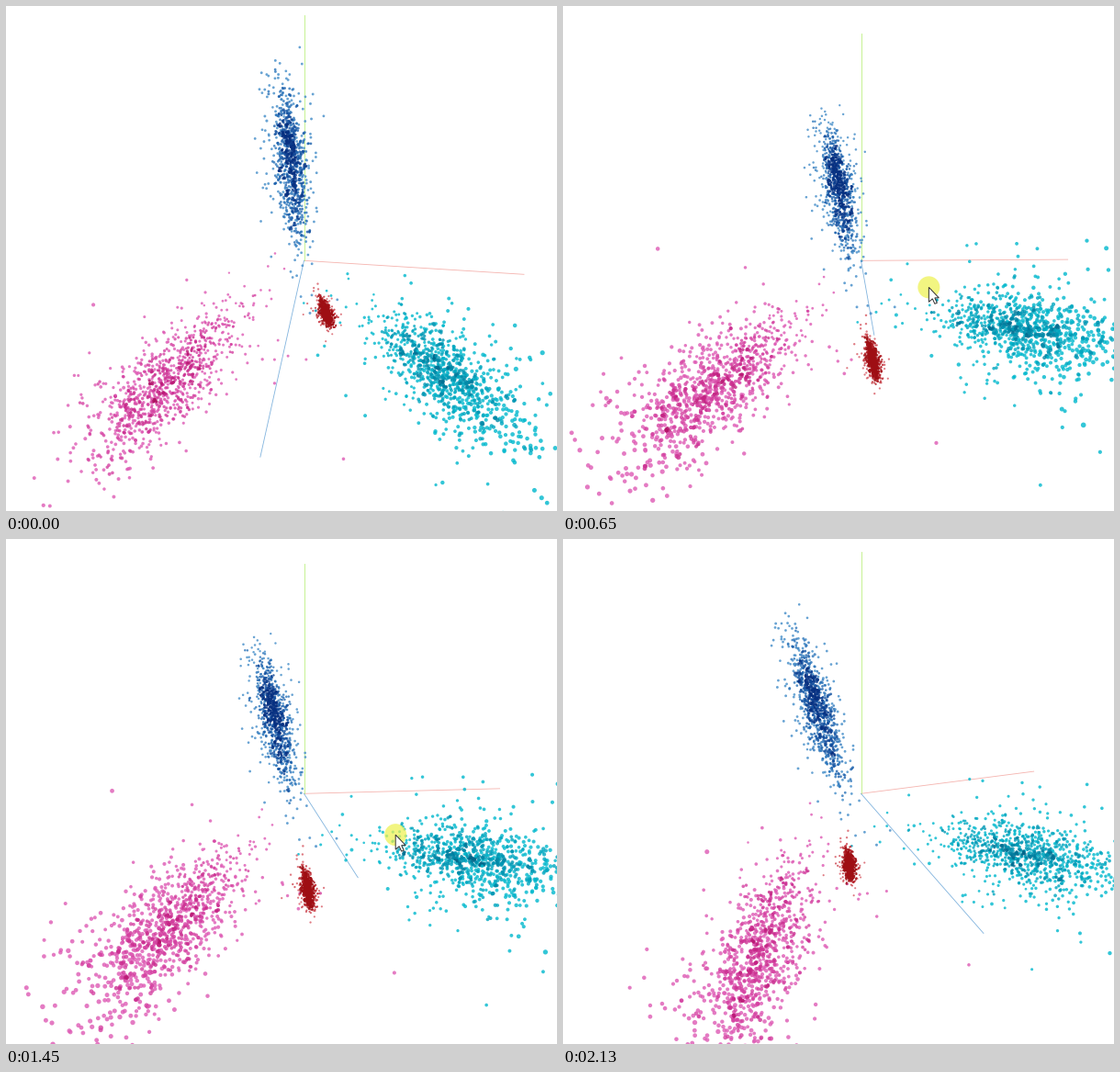
A matplotlib script for the animation above (2920 ms loop, 600x550 px).

```python
import numpy as np
import matplotlib.pyplot as plt
from matplotlib.animation import FuncAnimation
from matplotlib.patches import Circle, Polygon

W, H, DPI = 600, 550, 100
LOOP, STEP = 2920, 20
PX = 72 / DPI                      # points per pixel
ORIGIN = np.array([324.5, 277.3])
FOCAL, DISTANCE = 441, 1.928

# count, centre, long axis, cross spread, colour
CLUSTERS = [
    (950, (-.1145, .355, -.388), (-.033, .175, -.104), .045, "#428cc8"),
    (950, (-.55, -.385, .46), (-.095, -.042, .165), .078, "#de5ab4"),
    (950, (.60, -.185, .455), (.10, .02, .15), .073, "#00b8cd"),
    (850, (.092, -.737, -.517), (.016, -.08, -.033), .019, "#d75a64"),
]


def make_cloud():
    rng = np.random.default_rng(7)
    points, colours = [], []
    for count, centre, axis, spread, colour in CLUSTERS:
        # the long tail of each cluster points back to the origin
        along = (.75 * rng.standard_normal((count, 1))
                 - .5 * (rng.gumbel(size=(count, 1)) - .577))
        across = rng.standard_t(4, (count, 3)) * spread * .8
        points.append(centre + along * axis + across)
        colours.append(np.tile(plt.matplotlib.colors.to_rgb(colour),
                               (count, 1)))
    return np.concatenate(points), np.concatenate(colours)


def progress(t, start, end):
    return np.clip((t - start) / (end - start), 0, 1)


def slow_down(t, start, end, *powers):
    return 1 - (1 - progress(t, start, end)) ** np.array(powers)


def speed_up(t, start, end, *powers):
    return progress(t, start, end) ** np.array(powers)


def camera(t):
    """Azimuth and elevation: the first drag lowers the view, the second lifts it."""
    return ((.1175, .559)
            + slow_down(t, 275, 920, 1.5, 2) * (-.2075, -.474)
            + speed_up(t, 1130, 1700, 3, 1.6) * (-.234, .308))


def pointer(t):
    return ((437, 437)
            + slow_down(t, 30, 120, 1, 1) * (-63, -99)
            + slow_down(t, 275, 920, 2, 2) * (30, -39)
            + speed_up(t, 1130, 1690, 1.6, .6) * (52, 33)
            + speed_up(t, 1690, 2100, 1, 1) * (-50, -3))


def project(points, azimuth, elevation):
    sa, ca = np.sin(azimuth), np.cos(azimuth)
    se, ce = np.sin(elevation), np.cos(elevation)
    right = np.array([ca, 0, -sa])
    up = np.array([-sa * se, ce, -ca * se])
    toward = np.array([sa * ce, se, ca * ce])
    depth = np.maximum(DISTANCE - points @ toward, .3)
    flat = np.column_stack([points @ right, -(points @ up)])
    return ORIGIN + FOCAL * flat / depth[:, None], depth


def crowding(xy, cell=4):
    """How full, from 0 to 1, the small cell around each dot is."""
    grid = np.clip(xy // cell, -50, 250).astype(int) + 50
    index = grid[:, 0] * 301 + grid[:, 1]
    return np.clip((np.bincount(index)[index] - 1) / 6, 0, 1)


points, colours = make_cloud()

fig = plt.figure(figsize=(W / DPI, H / DPI), dpi=DPI, facecolor="white")
ax = fig.add_axes([0, 0, 1, 1])
ax.set(xlim=(0, W), ylim=(H, 0))
ax.axis("off")

ax.plot([0, W], [549.5, 549.5], color="#dcdcdc", lw=PX)
axis_lines = [ax.plot([], [], color=colour, lw=.85 * PX, zorder=2)[0]
              for colour in ("#f5b4af", "#bef082", "#82b4de")]
dots = ax.scatter(*np.zeros((2, len(points))), linewidths=0, zorder=3)
halo = ax.add_patch(Circle((0, 0), 12, fc="#eef250", alpha=.72, lw=0,
                           zorder=4))
ring = ax.add_patch(Circle((456, 332), 5.5, fill=False, ec="#1e88e5",
                           lw=4 * PX, alpha=.9, zorder=4))
ARROW = np.array([(0, 0), (0, 16), (4, 12.5), (6.5, 18), (9, 17),
                  (6.5, 11.5), (11, 11.5)])
arrow = ax.add_patch(Polygon(ARROW, fc="white", ec="#333333", lw=PX,
                             zorder=5))


def draw(n):
    t = n * STEP
    view = camera(t)

    ends, _ = project(np.eye(3), *view)
    for line, end in zip(axis_lines, ends):
        line.set_data(*zip(ORIGIN, end))

    # overlapping dots darken as if multiplied together
    xy, depth = project(points, *view)
    rgb = colours ** (1 + 1.8 * crowding(xy)[:, None])
    dots.set_offsets(xy)
    dots.set_sizes((5.8 / depth * PX) ** 2)
    dots.set_facecolor(np.column_stack([rgb, np.full(len(rgb), .8)]))

    tip = pointer(t)
    halo.center = tip
    halo.set_visible(30 <= t < 1690)
    arrow.set_xy(ARROW + tip)
    arrow.set_visible(30 <= t < 2100)
    ring.set_radius(3 + 4 * progress(t, 1690, 1910))
    ring.set_visible(1690 <= t < 1910)
    return [dots, halo, ring, arrow, *axis_lines]


anim = FuncAnimation(fig, draw, frames=LOOP // STEP, interval=STEP,
                     repeat=True, repeat_delay=0)
plt.show()
```
